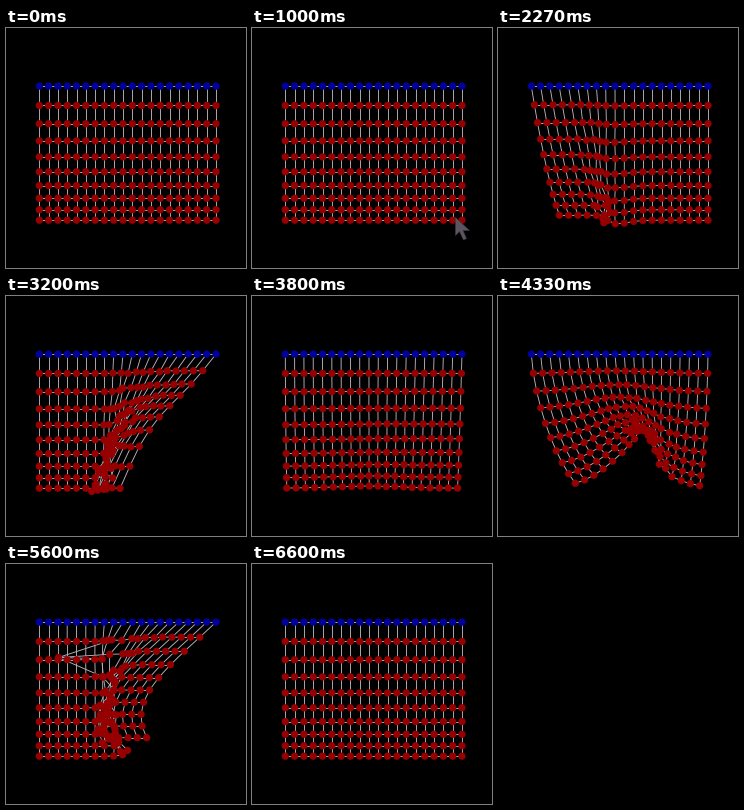
Recreate the animation shown at these times as a matplotlib script. Size 240 px wide and 240 px high, loop 6.67 s.

```python
import numpy as np
import matplotlib.pyplot as plt
from matplotlib.animation import FuncAnimation
from matplotlib.collections import LineCollection
from matplotlib.patches import Polygon

SIZE, DPI = 240, 100
FRAMES, INTERVAL = 100, 66.7
ROWS, COLS = 10, 20
PX = 72 / DPI

# Resting cloth: each vertical link stretches with the weight below it.
GAP = 9.3
STRETCH = 1.12
drops = GAP + STRETCH * np.arange(ROWS - 1, 0, -1)
rest_y = 57.6 + np.concatenate([[0], np.cumsum(drops)])
rest_x = 32.8 + GAP * np.arange(COLS)
REST = np.stack(np.meshgrid(rest_x, rest_y), axis=-1)

ROW_ID, COL_ID = np.indices((ROWS, COLS))
U = ROW_ID / (ROWS - 1)   # 0 at the pinned row, 1 at the hem
V = COL_ID / (COLS - 1)   # 0 at the left edge, 1 at the right
JITTER = np.random.default_rng(4).uniform(-1, 1, (ROWS, COLS, 2)) * (U > 0)[..., None]


def smooth(x, start, end):
    x = np.clip((x - start) / (end - start), 0, 1)
    return x * x * (3 - 2 * x)


def bump(x, center, width):
    return np.exp(-((x - center) / width) ** 2)


def crumple(dx, dy):
    """Join both shifts and scatter nodes where columns are pushed together."""
    squeeze = np.clip(-np.gradient(dx, axis=1) / GAP, 0, 1)
    return np.stack([dx, dy], axis=-1) + 4.5 * squeeze[..., None] * JITTER


def push_right():
    near = 1 - smooth(V, 0.2, 0.48)
    return crumple(28 * U * near, U * (4 * bump(V, 0.47, 0.1) - 5 * near))


def swing_left():
    ramp = np.sin(np.pi / 2 * np.clip((V - 0.4) / 0.6, 0, 1))
    return crumple(-96 * U ** 0.9 * ramp,
                   -24 * np.sin(np.pi * U ** 1.5) * ramp)


def lift():
    grow = U ** 1.4
    return crumple(44 * grow * (1 - 1.19 * smooth(V, 0.25, 0.9)),
                   -57 * grow * bump(V, 0.47, 0.3))


def gather_left():
    pull = np.sin(1.96 * U) * smooth(V, 0.25 + 0.2 * U, 0.8)
    return crumple(-75 * pull, -20 * pull)


# Shape, start, peak, end
POSES = [
    (push_right(), 22, 34, 44),
    (swing_left(), 42, 48, 57),
    (lift(), 55, 65, 78),
    (gather_left(), 76, 84, 96),
]

# Grabbed node, peak frame and the point it is dragged to
DRAGS = [
    ((6, 8), 29, (232, 198)),
    ((8, 10), 40, (233, 232)),
    ((8, 12), 52, (6, 228)),
    ((3, 14), 72, (222, 38)),
    ((2, 9), 84, (52, 93)),
]


def pulse(frame, start, peak, end):
    """Ease up to a short hold around the peak, then ease back."""
    return smooth(frame, start, peak - 1) * (1 - smooth(frame, peak + 1, end))


def cloth(frame):
    nodes = REST.copy()
    for shift, *times in POSES:
        nodes += pulse(frame, *times) * shift
    for (row, col), peak, goal in DRAGS:
        reach = 0.12 ** np.hypot(ROW_ID - row, COL_ID - col) * (U > 0)
        pull = pulse(frame, peak - 4, peak, peak + 4) * reach
        nodes += pull[..., None] * (np.array(goal) - nodes[row, col])
    return nodes


def links(nodes):
    across = np.stack([nodes[:, :-1], nodes[:, 1:]], axis=2)
    down = np.stack([nodes[:-1], nodes[1:]], axis=2)
    return np.concatenate([across.reshape(-1, 2, 2), down.reshape(-1, 2, 2)])


fig = plt.figure(figsize=(SIZE / DPI, SIZE / DPI), dpi=DPI, facecolor="black")
ax = fig.add_axes([0, 0, 1, 1])
ax.set_xlim(-0.5, SIZE - 0.5)
ax.set_ylim(SIZE - 0.5, -0.5)
ax.axis("off")

threads = LineCollection(links(REST), colors="#bcb4bc", linewidths=0.9 * PX,
                         zorder=1)
ax.add_collection(threads)
colors = ["#00009e"] * COLS + ["#960000"] * (COLS * (ROWS - 1))
dots = ax.scatter(*REST.reshape(-1, 2).T, s=(7.3 * PX) ** 2, c=colors,
                  linewidths=0, zorder=2)

ARROW = np.array([(0, 0), (0, 18), (4, 14), (8, 22.5), (11, 21),
                  (7.5, 13), (14, 13)])
cursor = Polygon(ARROW, closed=True, facecolor="#5c5560", edgecolor="#3c3840",
                 linewidth=0.6 * PX, zorder=3)
ax.add_patch(cursor)


def draw(frame):
    nodes = cloth(frame)
    threads.set_segments(links(nodes))
    dots.set_offsets(nodes.reshape(-1, 2))
    cursor.set_visible(15 <= frame < 24)
    glide = smooth(frame, 15, 24)
    cursor.set_xy(ARROW + (203 - 95 * glide, 189 - 31 * glide))
    return threads, dots, cursor


anim = FuncAnimation(fig, draw, frames=FRAMES, init_func=lambda: draw(0),
                     interval=INTERVAL, repeat=True, repeat_delay=0)
plt.show()
```
